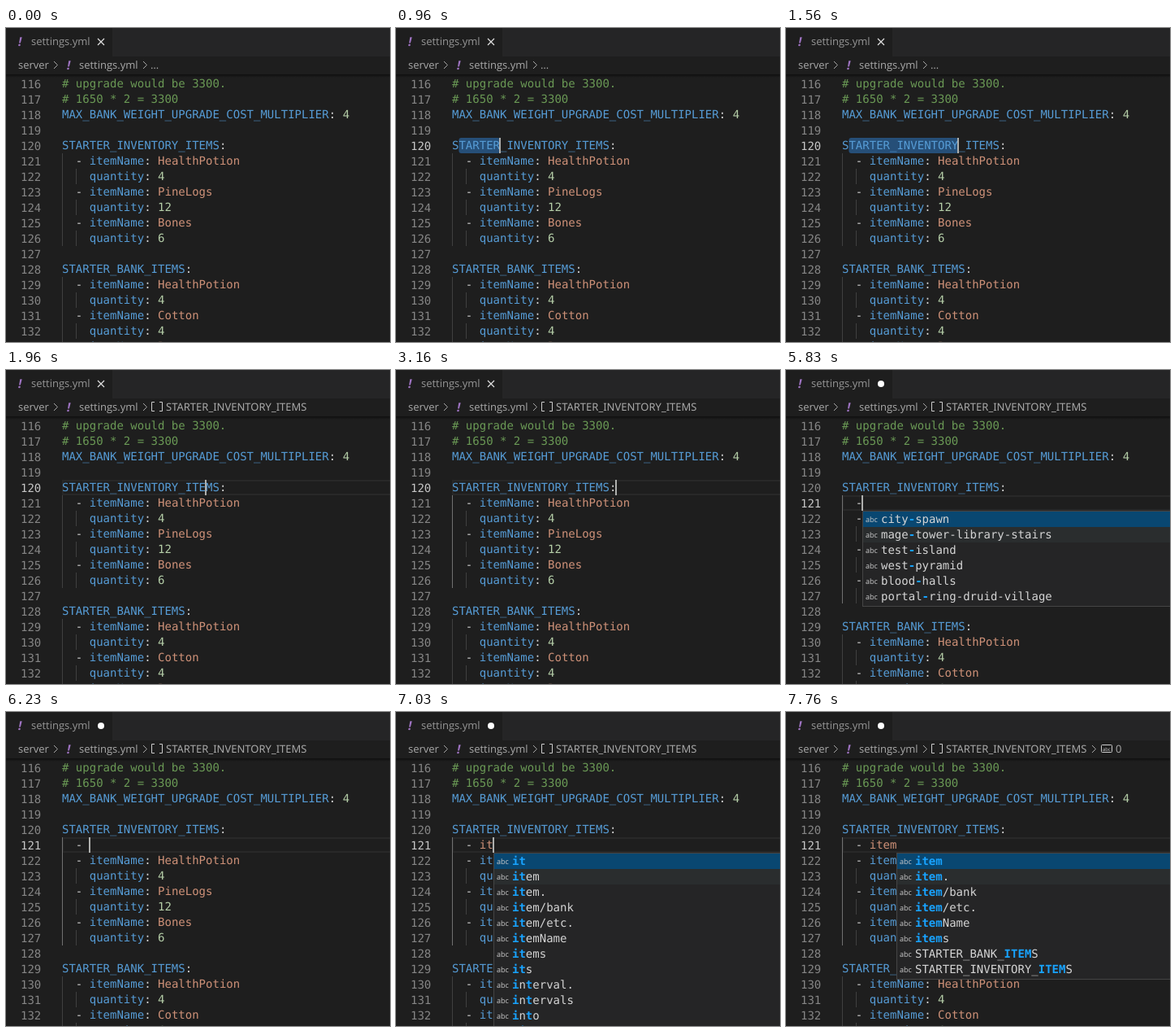
An HTML page with a canvas for the animation above (8 s loop, 473 by 386 pixels).

```html
<!DOCTYPE html>
<html lang="en">
<head>
<meta charset="utf-8">
<title>settings.yml</title>
<style>
  html, body { margin: 0; width: 100%; height: 100%; overflow: hidden; background: #1e1e1e; }
  canvas { display: block; width: 473px; height: 386px; }
</style>
</head>
<body>
<canvas id="stage"></canvas>
<script>
const W = 473, H = 386, LOOP = 8000;
const ROW = 19, CHAR = 8.43, LEFT = 69, FIRST = 115, TOP = 40;
const MONO = '14px "DejaVu Sans Mono", monospace';
const UI = '13px "Open Sans", sans-serif';
const CAPS = '13px "Noto Sans", sans-serif';
const color = {
  bg: '#1e1e1e', bar: '#252526', text: '#d4d4d4', key: '#569cd6', string: '#ce9178',
  number: '#b5cea8', comment: '#6a9955', crumb: '#a9a9a9', tab: '#969696', match: '#18a3ff'
};

const item = (name, count) => [`  - itemName: ${name}`, `    quantity: ${count}`];
const head = [
  '# upgrade is 1650 so a price', '# upgrade would be 3300.', '# 1650 * 2 = 3300',
  'MAX_BANK_WEIGHT_UPGRADE_COST_MULTIPLIER: 4', '', 'STARTER_INVENTORY_ITEMS:'
];
const tail = [
  ...item('HealthPotion', 4), ...item('PineLogs', 12), ...item('Bones', 6), '',
  'STARTER_BANK_ITEMS:', ...item('HealthPotion', 4), ...item('Cotton', 4), '  - itemName: Bones'
];

const places = ['city-spawn', 'mage-tower-library-stairs', 'test-island', 'west-pyramid',
  'blood-halls', 'portal-ring-druid-village'];
const itemWords = ['item', 'item.', 'item/bank', 'item/etc.', 'itemName', 'items'];
const longWords = [...itemWords, 'STARTER_BANK_ITEMS', 'STARTER_INVENTORY_ITEMS'];
const shortWords = ['it', ...itemWords, 'its', 'interval.', 'intervals', 'into', 'with'];

// Each step patches the editor state from its time on.
const show = time => [time, { cursor: true }];
const hide = time => [time, { cursor: false }];
const type = (time, text, query = '', words = null) =>
  [time, { typed: text, line: 121, col: text.length, cursor: true, query, words }];
const drag = [1, 2, 4, 7, 10, 13, 16, 19, 21, 22, 20]
  .map((col, i) => [700 + i * 73, { anchor: 1, col, guide: false }]);

const steps = [
  [0, { typed: null, line: 0, col: 0, anchor: null, cursor: false, guide: false,
        twin: false, symbol: false, index: false, query: '', words: null }],
  [500, { line: 120, col: 17, cursor: true, guide: true }],
  ...drag,
  [1560, { col: 17 }],
  [1640, { col: 10 }],
  [1720, { col: 8, twin: true }],
  [1800, { col: 21, anchor: null, twin: false }],
  [1960, { symbol: true }],
  hide(2300), show(2830),
  [3160, { col: 24, guide: true }],
  hide(3630), show(4160),
  type(4630, ''), hide(5100),
  type(5430, '  '),
  type(5830, '  -', '-', places),
  type(6230, '  - '), hide(6700),
  type(7030, '  - it', 'it', shortWords),
  type(7300, '  - ite', 'ite', longWords),
  type(7360, '  - item', 'item', longWords),
  [7630, { index: true }],
  hide(7760)
];
const stateAt = t => Object.assign({}, ...steps.filter(s => s[0] <= t).map(s => s[1]));

const canvas = document.getElementById('stage');
const ctx = canvas.getContext('2d');
const ratio = window.devicePixelRatio || 1;
canvas.width = W * ratio;
canvas.height = H * ratio;

const colX = col => LEFT + col * CHAR;
const rowY = line => TOP + (line - FIRST) * ROW;

function box(x, y, w, h, fill) {
  ctx.fillStyle = fill;
  ctx.fillRect(x, y, w, h);
}
function rounded(x, y, w, h, fill) {
  ctx.fillStyle = fill;
  ctx.beginPath();
  ctx.roundRect(x, y, w, h, 3);
  ctx.fill();
}
function write(text, x, y, fill, font = MONO) {
  ctx.font = font;
  ctx.fillStyle = fill;
  ctx.fillText(text, x, y);
}
function stroke(path, style, width = 1) {
  ctx.strokeStyle = style;
  ctx.lineWidth = width;
  ctx.stroke(new Path2D(path));
}

function drawCode(text, y) {
  if (text[0] === '#') return write(text, LEFT, y, color.comment);
  const [, indent, dash, word, colon, value] = text.match(/^( *)(- ?)?(\w*)(:?)(.*)$/);
  let col = indent.length;
  const run = (part, fill) => {
    if (part) write(part, colX(col), y, fill);
    col += part.length;
  };
  run(dash || '', color.text);
  run(word, colon ? color.key : color.string);
  run(colon, color.text);
  if (value) {
    col++;
    run(value.trim(), isNaN(value) ? color.string : color.number);
  }
}

function drawCursor(s) {
  // The caret sits between two characters, except at the line start.
  const x = Math.round(colX(s.col) - (s.col ? 1 : 0));
  box(x, rowY(s.line), 2, ROW, '#aeafad');
}

function drawEditor(s) {
  const lines = s.typed === null ? [...head, ...tail] : [...head, s.typed, ...tail];
  const blockEnd = s.typed === null ? 126 : 127;

  if (s.line && s.anchor === null) {
    ctx.strokeStyle = '#282828';
    ctx.lineWidth = 2;
    ctx.strokeRect(LEFT + 1, rowY(s.line) + 1, W, ROW - 2);
  }
  if (s.anchor !== null && s.col > s.anchor) {
    const x = colX(s.anchor), w = (s.col - s.anchor) * CHAR;
    rounded(x, rowY(120), w, ROW, '#264f78');
    if (s.twin) box(x, rowY(128), w, ROW, 'rgba(173,214,255,.15)');
  }
  lines.forEach((text, i) => {
    const line = FIRST + i, y = rowY(line);
    if (y > H) return;
    const inner = line === 121 ? Math.max(2, text.search(/\S|$/)) : text.search(/\S|$/);
    if (inner >= 2) {
      const active = s.guide && line <= blockEnd;
      box(LEFT, y, 1, ROW, active ? '#707070' : '#404040');
    }
    if (inner >= 4 && text.trim()) box(Math.round(colX(2)), y, 1, ROW, '#404040');
    write(line, 18, y + 15, line === s.line ? '#c6c6c6' : '#858585');
    drawCode(text, y + 14);
  });
  if (s.cursor) drawCursor(s);
}

function matches(word, query) {
  const low = word.toLowerCase(), start = low.indexOf(query);
  let from = 0;
  return [...query].map((c, i) => {
    const at = start >= 0 ? start + i : low.indexOf(c, from);
    from = at + 1;
    return at;
  });
}

function drawSuggestions(s) {
  const x = Math.round(colX(s.col)), y = rowY(122);
  const height = s.words.length * ROW + 4;
  box(x, y, W, height, '#454545');
  box(x + 1, y + 1, W, height - 2, color.bar);
  s.words.forEach((word, i) => {
    const top = y + 1 + i * ROW;
    if (i < 2) box(x + 1, top, W, ROW, i ? '#2a2d2e' : '#094771');
    write('abc', x + 4, top + 13, '#cccccc', '9px "Open Sans", sans-serif');
    const hits = matches(word, s.query);
    [...word].forEach((c, j) => {
      const hit = hits.includes(j);
      write(c, x + 23 + j * CHAR, top + 14, hit ? color.match : color.text,
        hit ? 'bold ' + MONO : MONO);
    });
  });
}

function chevron(x) {
  stroke(`M${x - 2} 41l4.5 4.5l-4.5 4.5`, color.crumb);
}
function fileIcon(x, y) {
  write('!', x, y, '#a074c4', 'italic bold 15px "Open Sans", sans-serif');
}

function drawHeader(s) {
  box(0, 0, W, 57, color.bg);
  box(131, 0, W, 35, color.bar);
  fileIcon(15, 22);
  write('settings.yml', 31, 21, color.tab, UI);
  if (s.typed === null) {
    stroke('M113 13l8 8M121 13l-8 8', '#e0e0e0', 1.2);
  } else {
    ctx.fillStyle = '#ffffff';
    ctx.beginPath();
    ctx.arc(117, 17, 4, 0, 7);
    ctx.fill();
  }

  write('server', 15, 50, color.crumb, UI);
  chevron(61);
  fileIcon(75, 51);
  write('settings.yml', 90, 50, color.crumb, UI);
  chevron(171);
  if (s.symbol) {
    stroke('M183 39.5h-3.5v11h3.5M189 39.5h3.5v11h-3.5', '#cccccc');
    write('STARTER_INVENTORY_ITEMS', 197, 50, color.crumb, CAPS);
  } else {
    write('…', 178, 50, color.crumb, UI);
  }
  if (s.index) {
    chevron(379);
    stroke('M389.5 40.5h11q1 0 1 1v7q0 1 -1 1h-11q-1 0 -1 -1v-7q0 -1 1 -1z', '#cccccc');
    write('abc', 390, 47.5, '#cccccc', '6px "Open Sans", sans-serif');
    write('0', 406, 50, color.crumb, UI);
  }

  const shade = ctx.createLinearGradient(0, 57, 0, 61);
  shade.addColorStop(0, 'rgba(0,0,0,.5)');
  shade.addColorStop(1, 'rgba(0,0,0,0)');
  box(0, 57, W, 4, shade);
}

function frame() {
  const s = stateAt(performance.now() % LOOP);
  ctx.setTransform(ratio, 0, 0, ratio, 0, 0);
  ctx.textRendering = 'geometricPrecision';
  box(0, 0, W, H, color.bg);
  drawEditor(s);
  drawHeader(s);
  if (s.words) drawSuggestions(s);
  requestAnimationFrame(frame);
}
frame();
</script>
</body>
</html>
```
